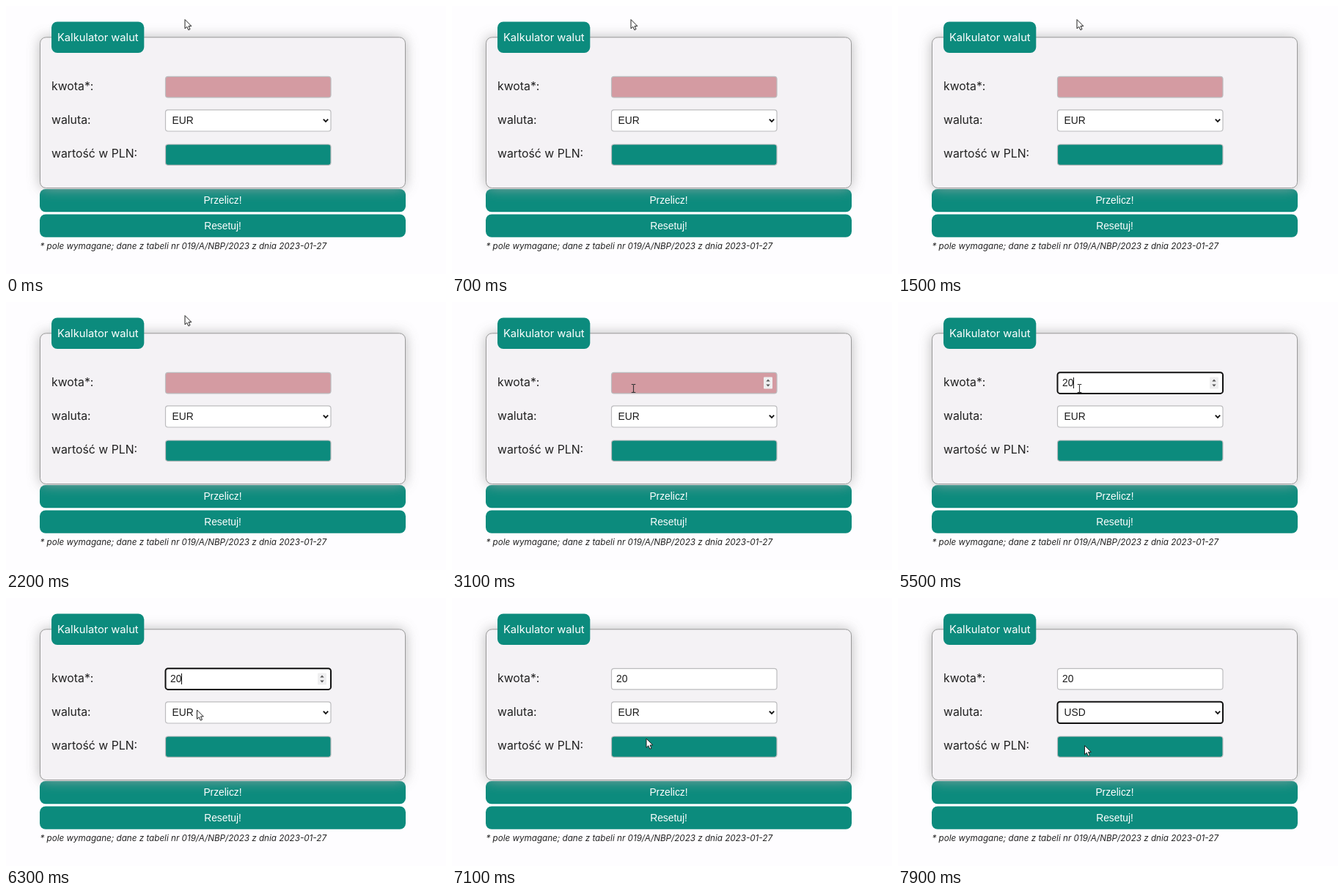
An HTML page that plays this animation: 600x366 px, repeating every 8 s.

```html
<!DOCTYPE html>
<html lang="pl">
<head>
<meta charset="utf-8">
<title>Kalkulator walut</title>
<style>
  html, body { margin: 0; width: 100%; height: 100%; overflow: hidden; background: #fefdff; }
  svg { display: block; width: 600px; height: 366px; }
  .label { font: 15.8px Inter, sans-serif; fill: #222; }
  .legend { font: 14.7px Inter, sans-serif; fill: #fff; }
  .note { font: italic 11.65px Inter, sans-serif; fill: #222; }
  .value { font: 13.8px "Liberation Sans", Arial, sans-serif; fill: #1c1c1c; }
  .button { font: 13.8px "Liberation Sans", Arial, sans-serif; fill: #fff; text-anchor: middle; }
  .green { fill: #0c8b7d; }
  .field { stroke: #bcbcbe; stroke-width: 1.2; }
  .focused { stroke: #111; stroke-width: 2; }
</style>
</head>
<body>
<svg viewBox="0 0 600 366">
  <defs>
    <filter id="blur" x="-20%" y="-40%" width="140%" height="180%">
      <feGaussianBlur stdDeviation="9"/>
    </filter>
  </defs>
  <rect width="600" height="366" fill="#fefdff"/>

  <rect class="green" x="46" y="250" width="499" height="31.3" rx="8"/>
  <rect x="46.5" y="43" width="498" height="206" rx="8" fill="#aaa" opacity=".85" filter="url(#blur)"/>
  <rect class="green" x="46" y="284.5" width="499" height="31.3" rx="8"/>
  <text class="button" x="295.5" y="270">Przelicz!</text>
  <text class="button" x="295.5" y="304.5">Resetuj!</text>

  <rect x="46.5" y="42.8" width="498" height="205.7" rx="8" fill="#f4f2f5" stroke="#999"/>
  <rect class="green" x="62" y="21.5" width="126.3" height="42.5" rx="8"/>
  <text class="legend" x="70" y="47.5">Kalkulator walut</text>

  <text class="label" x="62" y="115">kwota*:</text>
  <text class="label" x="62" y="161">waluta:</text>
  <text class="label" x="62" y="207">wartość w PLN:</text>

  <rect id="amount" class="field" x="217.5" y="96.3" width="225.5" height="28.6" rx="3.5"/>
  <text id="amountText" class="value" x="224" y="115"></text>
  <path id="caret" d="M239.5 103V118" stroke="#111"/>
  <g id="spinner">
    <rect x="425" y="102.5" width="12" height="16" rx="1" fill="#efeff0"/>
    <path d="M428.3 108.6h5.4l-2.7-3.2zM428.3 112.4h5.4l-2.7 3.2z" fill="#555"/>
  </g>

  <rect id="currency" class="field" x="217.5" y="141.8" width="225.5" height="29.2" rx="3.5" fill="#fff"/>
  <text id="currencyText" class="value" x="226.5" y="161"></text>
  <path d="M432.8 154.6l3.2 3.3 3.2-3.3" fill="none" stroke="#111" stroke-width="1.8"/>

  <rect class="green field" x="217.5" y="189" width="225.5" height="28.3" rx="3.5"/>

  <path id="arrow" d="M0 0V12.3L2.8 9.7 4.8 14.2 7 13.2 5 8.9H8.8Z" fill="#fff" stroke="#222" stroke-width="1"/>
  <path id="beam" d="M-2.8 -5.5H-.8L0 -4.8.8 -5.5H2.8M0 -4.8V4.8M-2.8 5.5H-.8L0 4.8.8 5.5H2.8" fill="none" stroke="#333" stroke-width="1.1"/>

  <text class="note" x="46.5" y="332">* pole wymagane; dane z tabeli nr 019/A/NBP/2023 z dnia 2023-01-27</text>
</svg>
<script>
  const LOOP = 8000, STEP = 100;
  const CLICK_AMOUNT = 3700, TYPE_FIRST = 5000, TYPE_SECOND = 5200;
  const CLICK_SELECT = 6600, PICK_USD = 7600;

  // Pointer path: start time, end time, destination
  const START = [244, 18.5];
  const MOVES = [
    [2200, 2800, [247.5, 118]],
    [5900, 6400, [262, 157]],
    [6700, 7100, [265, 192]],
    [7200, 7600, [254.5, 201.5]]
  ];

  const el = id => document.getElementById(id);
  const show = (id, visible) => el(id).setAttribute('visibility', visible ? 'visible' : 'hidden');
  const ease = p => p * p * (3 - 2 * p);

  function pointerAt(t) {
    let pos = START;
    for (const [from, to, target] of MOVES) {
      const k = ease(Math.min(1, Math.max(0, (t - from) / (to - from))));
      pos = pos.map((v, i) => v + (target[i] - v) * k);
    }
    return pos;
  }

  function render(t) {
    const [x, y] = pointerAt(t);
    const overAmount = x > 217 && x < 443 && y > 96 && y < 125;
    const focused = t >= CLICK_AMOUNT && t < CLICK_SELECT;
    const text = t < TYPE_FIRST ? '' : t < TYPE_SECOND ? '2' : '20';
    const blinkStart = t >= TYPE_SECOND ? TYPE_SECOND : t >= TYPE_FIRST ? TYPE_FIRST : CLICK_AMOUNT;

    el('amount').setAttribute('fill', text ? '#fff' : '#d49ba2');
    el('amount').classList.toggle('focused', focused);
    el('amountText').textContent = text;
    el('caret').setAttribute('transform', `translate(${(text.length - 2) * 7.7})`);
    show('caret', focused && (t - blinkStart) % 1000 < 500);
    show('spinner', focused || overAmount);

    el('currency').classList.toggle('focused', t >= PICK_USD);
    el('currencyText').textContent = t >= PICK_USD ? 'USD' : 'EUR';

    for (const id of ['arrow', 'beam']) {
      el(id).setAttribute('transform', `translate(${x} ${y})`);
      show(id, (id === 'beam') === overAmount);
    }
  }

  const origin = performance.now();
  function tick() {
    const t = (performance.now() - origin) % LOOP;
    render(Math.floor(t / STEP) * STEP);
    requestAnimationFrame(tick);
  }
  tick();
</script>
</body>
</html>
```
